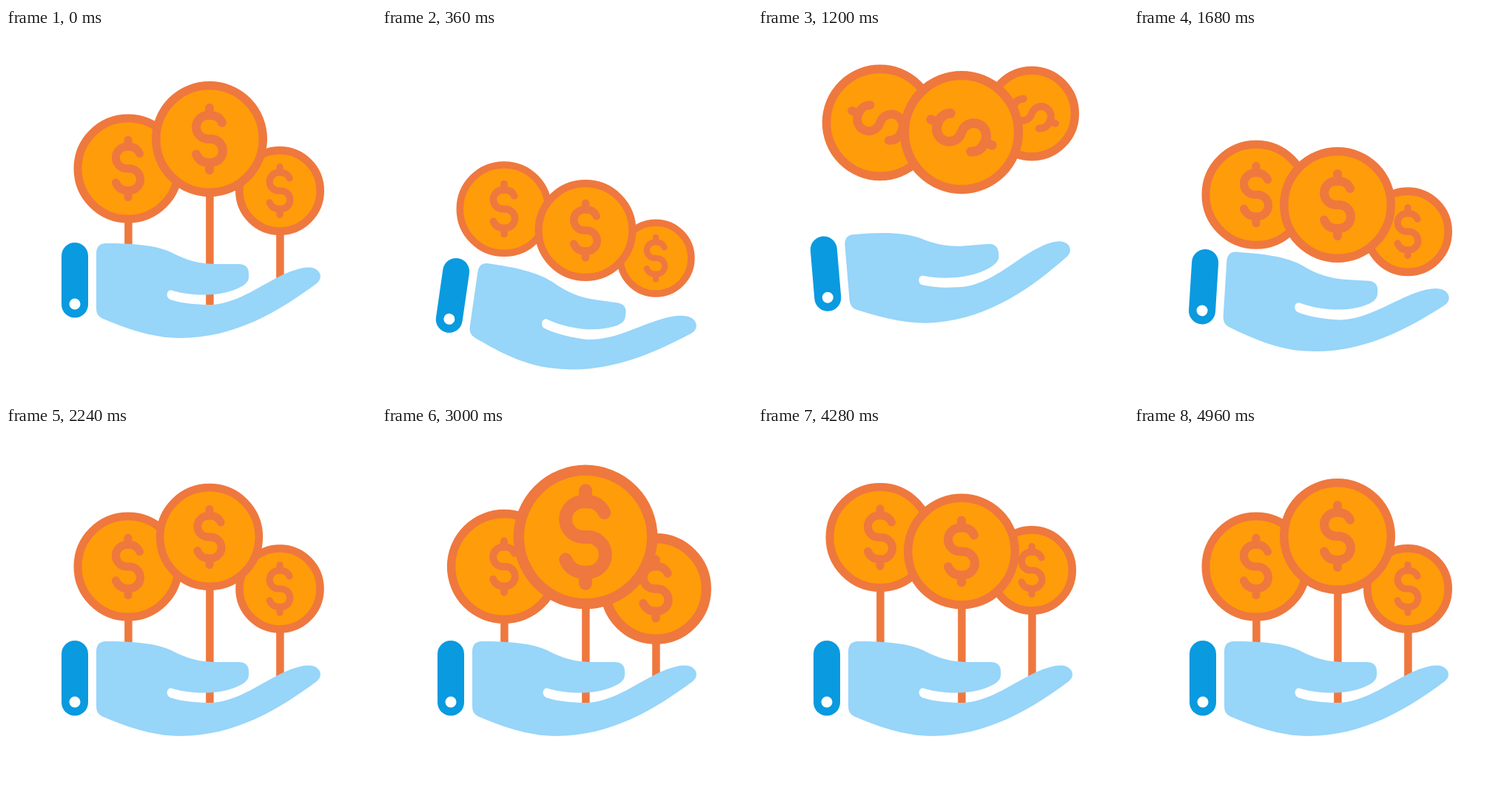
Recreate the animation shown at these times as an HTML page. Size 500 by 500 pixels, loop 5000 ms.

```html
<!DOCTYPE html>
<html lang="en">
<head>
<meta charset="utf-8">
<title>Coins in hand</title>
<style>
  html, body { margin: 0; width: 100%; height: 100%; overflow: hidden; background: #fff; }
  svg { display: block; width: 100vw; height: 100vh; }
  .stem, .ring, .sign { stroke: #ef783e; }
  .ring { fill: #ff9c0a; }
  .sign { fill: none; stroke-width: 12; stroke-linecap: round; stroke-linejoin: round; }
</style>
</head>
<body>
<svg viewBox="0 0 500 500">
  <defs>
    <path id="dollar" d="M17-22C14.500-28 9-32 2-32H-2A16 16 0 0 0-2 0H2A16 16 0 0 1 2 32H-1C-9 32-15 28-18 20.500M0-42V-33M0 33V42"/>
  </defs>
  <g id="coins"></g>
  <g id="hand">
    <path fill="#97d5f9" d="M122 305Q122 291 135 291C170 291 203 293 225 304C244 314 262 319 285 319H316Q328 320 328 332V338Q327 346 313 352C289 363 252 363 224 354.500C217 353 215 364 222 367C240 373 262 374 279 374C315 371 345 347 375 333Q397 323 410 323.500C424 324 430 337 420 345C370 382 310 419 235 419C197 419 160 405 130 392.500Q122 389 122 379Z"/>
    <rect x="75" y="290" width="36" height="101.500" rx="18" fill="#0a9ae0"/>
    <circle cx="93" cy="373" r="7.500" fill="#fff"/>
  </g>
</svg>
<script>
const LOOP = 5000, LAUNCH = 720, PEAK = 1040, LAND = 1390;
const PIVOT = { x: 93, y: 358 };
const NS = 'http://www.w3.org/2000/svg';

// rest: height on the stem, sit: height on the palm, top: peak of the toss
const coins = [
  { x: 370, rest: 220, sit: 271.3, top: 68, r: 60, ring: 10.7, sign: .77, base: 350,
    pulse: 2680, peak: 3030, hold: 3100, back: 3600, bob: [3660, 3980, 4430, 4830] },
  { x: 165, rest: 190, sit: 226, top: 98.5, r: 73.5, ring: 11, sign: .92, base: 312,
    pulse: 2820, peak: 3220, hold: 3320, back: 3800, bob: [3520, 3840, 4250, 4680] },
  { x: 275, rest: 150, sit: 254.5, top: 106, r: 78, ring: 11.5, sign: 1, base: 386,
    pulse: 2480, peak: 2880, hold: 2960, back: 3360, bob: [3940, 4260, 4600, 5000] }
];

const mix = (a, b, k) => a + (b - a) * k;
const ease = k => (1 - Math.cos(Math.PI * k)) / 2;

// Eased value at t from [time, value] pairs
function track(t, keys) {
  if (t <= keys[0][0]) return keys[0][1];
  for (let i = 1; i < keys.length; i++) {
    const [t0, v0] = keys[i - 1], [t1, v1] = keys[i];
    if (t < t1) return mix(v0, v1, ease((t - t0) / (t1 - t0)));
  }
  return keys[keys.length - 1][1];
}

function add(parent, tag, attrs) {
  const el = document.createElementNS(NS, tag);
  for (const name in attrs) el.setAttribute(name, attrs[name]);
  return parent.appendChild(el);
}

for (const c of coins) {
  const root = document.getElementById('coins');
  c.stem = add(root, 'line', { class: 'stem', x1: c.x + .4, x2: c.x + .4, 'stroke-width': 10.5 });
  c.body = add(root, 'g', {});
  add(c.body, 'circle', { class: 'ring', r: c.r - c.ring / 2, 'stroke-width': c.ring });
  c.mark = add(c.body, 'use', { class: 'sign', href: '#dollar' });
}
const hand = document.getElementById('hand');

const drop = t => track(t, [[0, 0], [500, 25], [1000, -20], [1500, 12.5], [2000, 0]]);
const tilt = t => track(t, [[0, 0], [500, 10], [1000, -10], [1500, 5], [2000, 0]]);
const planted = t => track(t, [[0, 1], [500, 0], [1500, 0], [2000, 1]]);
const dip = (t, x) => drop(t) + (x - PIVOT.x) * Math.sin(tilt(t) * Math.PI / 180);

function height(c, t) {
  const onPalm = at => c.sit + dip(at, c.x);
  if (t > LAUNCH && t < PEAK) {
    const k = (PEAK - t) / (PEAK - LAUNCH);
    return mix(c.top, onPalm(LAUNCH), k * k);
  }
  if (t >= PEAK && t < LAND) {
    const k = (t - PEAK) / (LAND - PEAK);
    return mix(c.top, onPalm(LAND), k * k);
  }
  const [a, b, d, e] = c.bob;
  return mix(onPalm(t), c.rest, planted(t)) + track(t, [[a, 0], [b, 20], [d, -40], [e, 0]]);
}

function drawCoin(c, t) {
  const y = height(c, t), k = planted(t), p = c.pulse;
  const toss = track(t, [[0, 1], [500, .85], [1000, 1.1], [1500, 1]]);
  const grow = track(t, [[p - 480, 1], [p - 120, .9], [p, .9], [c.peak, 1.255], [c.hold, 1.255], [c.back, 1]]);
  const sign = c.sign * track(t, [[p - 400, 1], [p + 150, .85], [p + 550, 1.2], [p + 1000, 1]]);
  const spin = track(t, [[500, 0], [LAUNCH, -2], [LAND, 360]]);
  c.body.setAttribute('transform', `translate(${c.x} ${y}) scale(${toss * grow})`);
  c.mark.setAttribute('transform', `rotate(${spin}) scale(${sign})`);
  c.stem.setAttribute('y1', y);
  c.stem.setAttribute('y2', mix(y, c.base + dip(t, c.x), k));
}

function draw(now) {
  const t = now % LOOP;
  hand.setAttribute('transform', `translate(0 ${drop(t)}) rotate(${tilt(t)} ${PIVOT.x} ${PIVOT.y})`);
  for (const c of coins) drawCoin(c, t);
}

let start;
function frame(now) {
  start ??= now;
  draw(now - start);
  requestAnimationFrame(frame);
}
draw(0);
requestAnimationFrame(frame);
</script>
</body>
</html>
```
